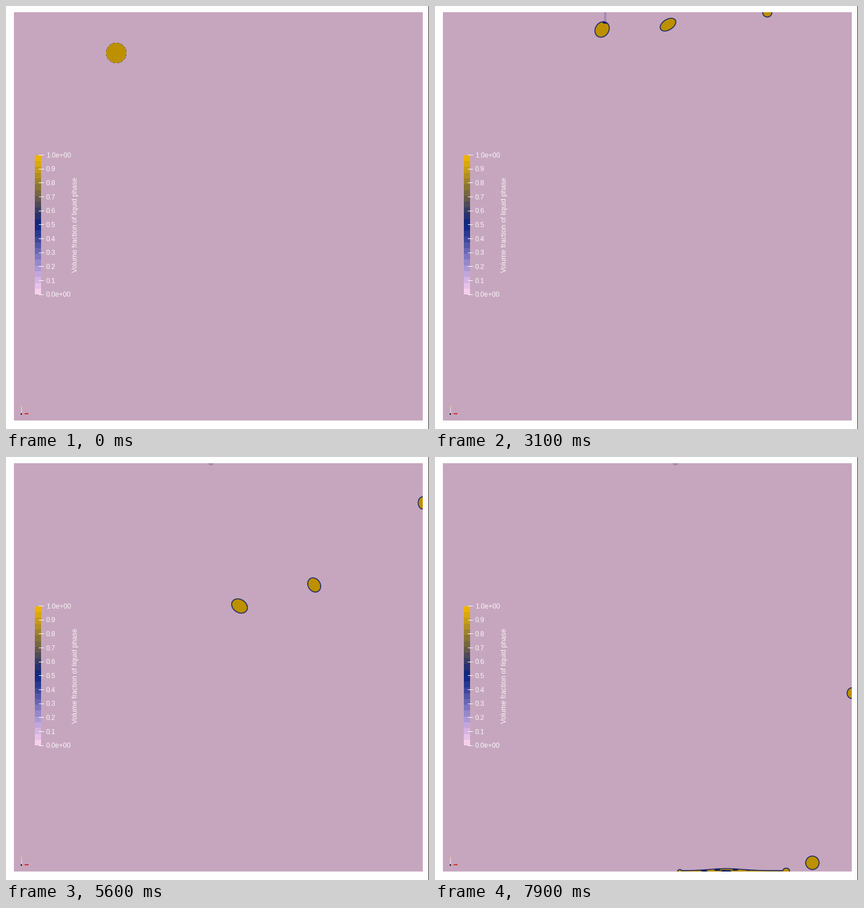
A matplotlib script for the animation above (8000 ms loop, 748 by 748 pixels).

```python
import numpy as np
import matplotlib.pyplot as plt
from matplotlib.animation import FuncAnimation
from matplotlib.colors import LinearSegmentedColormap
from matplotlib.patches import Rectangle

SIZE, DPI, FRAMES = 748, 100, 80
LEFT, TOP, RIGHT, FLOOR = 14, 11, 737, 733
HALF_G = 0.284              # half the gravity, px per frame squared
HIT, TURN, DETACH = 3, 10, 31   # impact, film at its widest, drops come off
SPLASH = 77                 # impact on the floor
HIT_X = 212
HAZE = -1.15                # depth that shows as a faint trace of liquid

COLORS = ["#f7cfed", "#cfb0e3", "#9e8fd0", "#6a68b5", "#3a4499", "#0a2380",
          "#343a66", "#665a4a", "#8f7a30", "#c0981a", "#ecb400"]
cmap = LinearSegmentedColormap.from_list("phase", COLORS, N=512)
# the scene is shaded darker than its legend
lut = (cmap(np.linspace(0, 1, 512))[:, :3] * 255 * .8 + .5).astype(np.uint8)

px = (np.arange(LEFT, RIGHT) + .5)[None, :]
py = (np.arange(TOP, FLOOR) + .5)[:, None]


# --- motion: each function gives x, y, semi-axes and angle of an ellipse ---

def burst(n):
    """Fast spread after the impact, slowing to a stop."""
    return 1 - (1 - (n - HIT) / (TURN - HIT)) ** 2.5


def drop(n, x, y, vy, radius, angle, stretch):
    """Film end that swells, sinks from the wall, then falls and wobbles."""
    t = n - DETACH
    if t >= 0:
        y += vy * t + HALF_G * t * t
    else:
        sink = max(0, (n - 13) / (DETACH - 13)) ** 1.5
        y = TOP + (y - TOP) * sink
        radius = np.interp(n, [HIT, TURN, 27], [4, 8, radius])
        stretch *= max(0, n - TURN) / (DETACH - TURN)
    k = 1 + stretch
    return x, y, radius * k, radius / k, angle


def left_drop(n):
    t = n - DETACH
    u = (n - TURN) / (DETACH - TURN)
    if t >= 0:
        x = 295.5 + 4.7 * t
    elif u >= 0:
        x = 162.5 + 133 * u * u * (2.26 - 1.26 * u)
    else:
        x = HIT_X - 49.5 * burst(n)
    wobble = .2 * np.cos(np.pi * (max(t, 0) - 8) / 24)
    return drop(n, x, 41.5, 1.78, 13.1, 57, wobble)


def right_drop(n):
    t = n - DETACH
    if t >= 0:
        x = 412 + 5.32 * t
    elif n >= TURN:
        x = 412 + 4 * t
    else:
        x = HIT_X + 116 * burst(n)
    s = max(t, 0)
    wobble = .28 * np.exp(-(s / 30) ** 2) * np.cos(np.pi * s / 33)
    return drop(n, x, 33, .63, 11.9, 32, wobble)


def bead(n):
    """Small half drop: runs along the ceiling, then down the right wall."""
    t = n - HIT
    x = HIT_X + 11.7 * t + 48 * (1 - np.exp(-t / 2))
    s = max(0, n - 42)
    y = TOP + 1.37 * s + .26 * s * s
    pull = 3.9 * s * np.exp(1 - s / 3)
    return min(x, RIGHT), y, 8.3 - pull / 8, min(8.5, 4 + t) + min(s / 10, 1) + pull


# --- liquid: signed depth below the surface, positive inside ---

def distance(x, y, a, b, angle=0):
    """Window around an ellipse and the signed depth in it."""
    r = int(max(a, b)) + 6
    c0, c1 = (int(np.clip(v - LEFT, 0, RIGHT - LEFT)) for v in (x - r, x + r + 1))
    r0, r1 = (int(np.clip(v - TOP, 0, FLOOR - TOP)) for v in (y - r, y + r + 1))
    dx, dy = px[:, c0:c1] - x, y - py[r0:r1]
    ca, sa = np.cos(np.radians(angle)), np.sin(np.radians(angle))
    u, v = dx * ca + dy * sa, dy * ca - dx * sa
    rad = np.sqrt((u / a) ** 2 + (v / b) ** 2) + 1e-6
    slope = np.sqrt((u / a ** 2) ** 2 + (v / b ** 2) ** 2) + 1e-7
    return np.s_[r0:r1, c0:c1], rad * (1 - rad) / slope


def blob(f, shape, cap=99):
    win, d = distance(*shape)
    f[win] = np.maximum(f[win], np.minimum(d, cap))


def stain(f, *shape):
    """Mixed zone: pull liquid down to the middle of the scale."""
    win, d = distance(*shape)
    f[win] = np.minimum(f[win], np.maximum(-d, 0))


def film(f, x0, x1, thick, hump=0, xc=0, sigma=1, floor=False):
    rows = np.s_[-30:] if floor else np.s_[:30]
    depth = FLOOR - py[rows] if floor else py[rows] - TOP
    d = thick + hump * np.exp(-((px - xc) / sigma) ** 2) - depth
    d = np.minimum(d, np.minimum(px - x0, x1 - px))
    f[rows] = np.maximum(f[rows], d)


def ceiling_film(f, n):
    mid = HIT_X + 5.6 * (n - HIT)
    hump = max(0, 5 * np.sin(np.pi * (n - HIT) / 20))
    film(f, left_drop(n)[0], right_drop(n)[0], min(4.5, .65 * (26 - n)), hump, mid, 24)
    if n <= TURN:
        film(f, right_drop(n)[0], bead(n)[0], 3)
    if 6 <= n <= 18:
        stain(f, mid, 13.5, 5, 2.5)


def floor_film(f, n):
    k = n - SPLASH
    x0, x1 = 483 - 25 * k, 553 + 34 * k
    film(f, x0, x1, 1.6, 6 - 1.2 * k, 515, 24 + 8 * k, True)
    blob(f, (x0, FLOOR, 4, 3.5))
    blob(f, (x1, FLOOR - 1, 6, 5))
    rng = np.random.default_rng(4)
    for x, y in zip(rng.normal(515, 8 + 8 * k, 9), rng.uniform(728, 732, 9)):
        stain(f, x, y, 4, .8)


def scene(n):
    f = np.full((FLOOR - TOP, RIGHT - LEFT), -99.0)
    if n < HIT + 4:
        blob(f, (195 + 5.7 * n, 83 - 19 * n + HALF_G * n * n, 18, 18))
    if n >= HIT:
        if n < 27:
            ceiling_film(f, n)
        for part in (left_drop, right_drop, bead):
            blob(f, part(n))
    if 27 <= n <= 32:       # last thread to the ceiling
        x = 301 + 1.5 * (n - DETACH)
        blob(f, (x, 19, .3, 9), HAZE)
        stain(f, x, 29 + 2 * (n - DETACH), 4, 1.5)
    if n > 32:              # residue left on the ceiling
        blob(f, (338 + 2.72 * (n - 47), TOP, 3.5, 2.5), HAZE)
    if n >= SPLASH:
        floor_film(f, n)
    width = 1.5 if n else .3
    level = np.clip(.5 + f / (2 * width), 0, 1)
    return lut[(level * 511).astype(int)]


# --- stage ---

fig = plt.figure(figsize=(SIZE / DPI, SIZE / DPI), dpi=DPI, facecolor="#fefefe")
ax = fig.add_axes([0, 0, 1, 1])
ax.axis("off")
panel = ax.imshow(scene(0), extent=(LEFT, RIGHT, FLOOR, TOP),
                  interpolation="nearest", aspect="auto")
ax.set_xlim(0, SIZE)
ax.set_ylim(SIZE, 0)


def rect(x, y, w, h, color):
    ax.add_patch(Rectangle((x, y), w, h, fc=color, lw=0, antialiased=False, zorder=3))


def label(x, y, text, px=12, **kw):
    ax.text(x, y, text, color="white", alpha=.9, family="Liberation Sans",
            size=px * 72 / DPI, va="baseline", zorder=4, **kw)


# colour legend
BAR_TOP, BAR_H, BANDS = 264, 246, 24
for i in range(BANDS):
    y0, y1 = (round(BAR_TOP + BAR_H * j / BANDS) for j in (i, i + 1))
    rect(51, y0, 11, y1 - y0, cmap(1 - i / (BANDS - 1)))
for i in range(11):
    y = 263.5 + 24.67 * i
    rect(58, int(y), 9, 1, "white")
    label(71, y + 4, f"{1 - i / 10:.1f}" + ("" if i % 10 else "e+00"))
label(126, 386.5, "Volume fraction of liquid phase", px=12.2, ha="center",
      rotation=90, rotation_mode="anchor")

# orientation axes
rect(27, 710, 1, 10, "#ece4ea")
rect(26, 707, 3, 2, "#e3c27c")
rect(28, 721, 8, 1, "#d88a90")
rect(33, 720, 7, 2, "#d02c30")
rect(40, 719, 2, 3, "#e0aab0")
rect(26, 720, 2, 3, "#201820")

rect(747, 0, 1, SIZE, "#30252e")


def update(n):
    panel.set_data(scene(n))
    return [panel]


anim = FuncAnimation(fig, update, frames=FRAMES, interval=100, repeat=True,
                     repeat_delay=0, blit=False)
plt.show()
```
